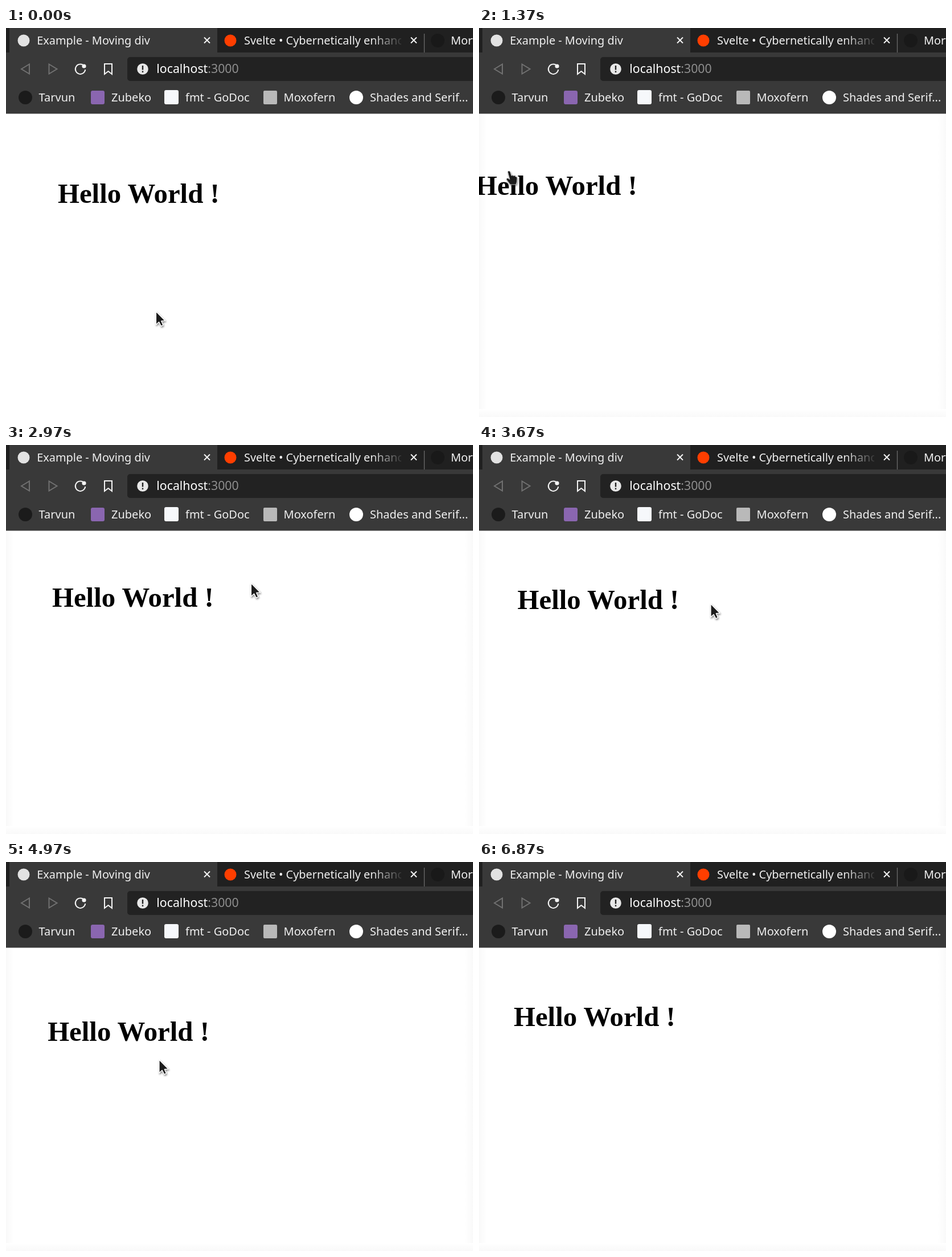
These frames come from a looping animation (820 px wide and 683 px high, 7910 ms). An HTML page:

```html
<!DOCTYPE html>
<html lang="en">
<head>
<meta charset="utf-8">
<title>Moving div</title>
<style>
  html, body { margin: 0; width: 100%; height: 100%; overflow: hidden; background: #fff; }
  svg { display: block; width: 820px; height: 683px; }
  text { font-family: "Noto Sans", sans-serif; font-size: 19.9px; fill: #f0f0f0; }
  #bookmarks text { font-size: 20px; }
  #address { font-size: 21.3px; fill: #fff; }
  #address tspan { fill: #8f8f8f; }
  #hello { font: bold 48.8px "Liberation Serif", serif; fill: #000; }
  .line { fill: none; stroke: #f4f4f4; stroke-width: 2; }
  .dim { stroke: #717171; }
  .pointer { fill: #1b1b1b; stroke: #fff; stroke-width: 1.5; stroke-linejoin: round;
             filter: drop-shadow(1px 2px 1.5px #0007); }
</style>
</head>
<body>
<svg viewBox="0 0 820 683">
  <defs>
    <linearGradient id="titleFade" gradientUnits="userSpaceOnUse" x1="640" x2="700">
      <stop stop-color="#f0f0f0"/><stop offset="1" stop-color="#202020"/>
    </linearGradient>
    <linearGradient id="edge">
      <stop stop-color="#f9f9f9"/><stop offset="1" stop-color="#fff"/>
    </linearGradient>
    <clipPath id="titleClip"><rect x="410" width="284" height="44"/></clipPath>
    <path id="close" class="line" d="M-5-5 5 5M5-5-5 5"/>
  </defs>

  <rect width="820" height="683" fill="#fff"/>
  <g id="vignette" fill="url(#edge)">
    <rect y="150" width="14" height="533"/>
    <rect width="14" height="533" transform="translate(820 150) scale(-1 1)"/>
    <rect width="14" height="820" transform="translate(0 683) rotate(-90)"/>
  </g>

  <text id="hello">Hello World !</text>

  <rect width="820" height="150.5" fill="#393939"/>
  <path d="M0 0H6V43H0ZM371 0H820V43H371Z" fill="#202020"/>
  <path d="M734.5 10V43" stroke="#6b6b6b" stroke-width="1.3"/>
  <circle cx="31" cy="22" r="10.5" fill="#e2e2e2"/>
  <text x="54.2" y="29">Example - Moving div</text>
  <use href="#close" x="353" y="21.5"/>
  <circle cx="394" cy="22" r="10.5" fill="#ff3e00"/>
  <text x="418" y="29" clip-path="url(#titleClip)" style="fill:url(#titleFade)">Svelte • Cybernetically enhanced</text>
  <use href="#close" x="716" y="21.5"/>
  <circle cx="758" cy="22" r="12" fill="#191919"/>
  <text x="781" y="29">Morvel</text>

  <path class="line dim" d="M27 72 41 63.5V80.5Z"/>
  <path class="line dim" d="M75.5 63.5 89.5 72 75.5 80.5Z"/>
  <path class="line" d="M135 64.7A8.7 8.7 0 1 0 139.200 73"/>
  <circle cx="137" cy="67" r="3.600" fill="#f4f4f4"/>
  <path class="line" d="M173 63H186V81L179.500 76 173 81Z"/>
  <rect x="213" y="51" width="620" height="42" rx="5" fill="#222"/>
  <circle cx="240" cy="72" r="9.800" fill="#e8e8e8"/>
  <path d="M240 66V73.500M240 75.500V78" stroke="#222" stroke-width="2.400"/>
  <text id="address" x="264.300" y="79">localhost<tspan>:3000</tspan></text>

  <g id="bookmarks">
    <circle cx="34" cy="122" r="12" fill="#1b1b1b"/>
    <text x="57.500" y="129">Tarvun</text>
    <rect x="149" y="110" width="24" height="24" rx="3" fill="#8a66b0"/>
    <text x="185" y="129">Zubeko</text>
    <rect x="278" y="109" width="25" height="25" rx="3" fill="#f6f8fb"/>
    <text x="315" y="129">fmt - GoDoc</text>
    <rect x="452" y="110" width="24" height="24" rx="2" fill="#b9b9b9"/>
    <text x="487.500" y="129">Moxofern</text>
    <circle cx="615" cy="122" r="12" fill="#fff"/>
    <text x="639" y="129">Shades and Serif...</text>
  </g>

  <g id="cursor">
    <path id="arrow" class="pointer" d="M.300.500V24L5.500 19.200 9.300 26.500 13 24.700 9.800 17.500 16.500 17Z"/>
    <path id="hand" class="pointer" style="stroke-width:.8;stroke:#ddd"
      d="M-1.500 2C-1.500-.5 2-.5 3 2L5 8.500C6 7 8 7.500 8.500 9 10 7.800 11.500 8.500 12 10 14 9.500 15 11 15 13L14.500 19 13 24H3L-3.500 15.500C-4.500 13-2 12 0 13.500L2 15Z"/>
  </g>
</svg>
<script>
  const LOOP = 7910;
  const byId = id => document.getElementById(id);
  const show = (id, on) => byId(id).style.display = on ? "" : "none";
  const moveTo = (id, x, y) => byId(id).setAttribute("transform", `translate(${x} ${y})`);

  // Turning points: [ms, x, y]. The heading is pulled about and settles at REST.
  const REST = [61, 288];
  const helloPath = [
    [0, 91, 307], [1370, -6, 293], [2330, 120, 262], [2970, 81, 284], [3200, ...REST],
    [4270, 77, 289], [4830, 75, 313], [5730, 47, 321], [6070, ...REST]
  ];
  const cursorPath = [
    [0, 263, 497], [1370, 52, 251], [2330, 349, 224], [2970, 430, 242], [4270, 388, 307],
    [5730, 134, 391], [5900, 127, 407], [6370, 127, 407], [6570, 503, 515],
    [6740, 503, 515], [6840, 741, 594]
  ];

  const ease = k => k * k * (3 - 2 * k);

  function along(path, t) {
    const next = path.findIndex(p => p[0] > t);
    if (next < 0) return path.at(-1).slice(1);
    const [t0, x0, y0] = path[next - 1], [t1, x1, y1] = path[next];
    const k = ease((t - t0) / (t1 - t0));
    return [x0 + (x1 - x0) * k, y0 + (y1 - y0) * k];
  }

  function draw(now) {
    const t = now % LOOP;
    const [hx, hy] = along(helloPath, t), [cx, cy] = along(cursorPath, t);
    const hovering = cx > hx && cx < hx + 285 && cy > hy - 48 && cy < hy + 12;
    moveTo("hello", hx, hy);
    moveTo("cursor", cx, cy);
    show("cursor", t < 6870);
    show("hand", hovering);
    show("arrow", !hovering);
    show("vignette", t >= 30);
  }

  const start = performance.now();
  function tick() {
    draw(performance.now() - start);
    requestAnimationFrame(tick);
  }
  tick();
</script>
</body>
</html>
```
